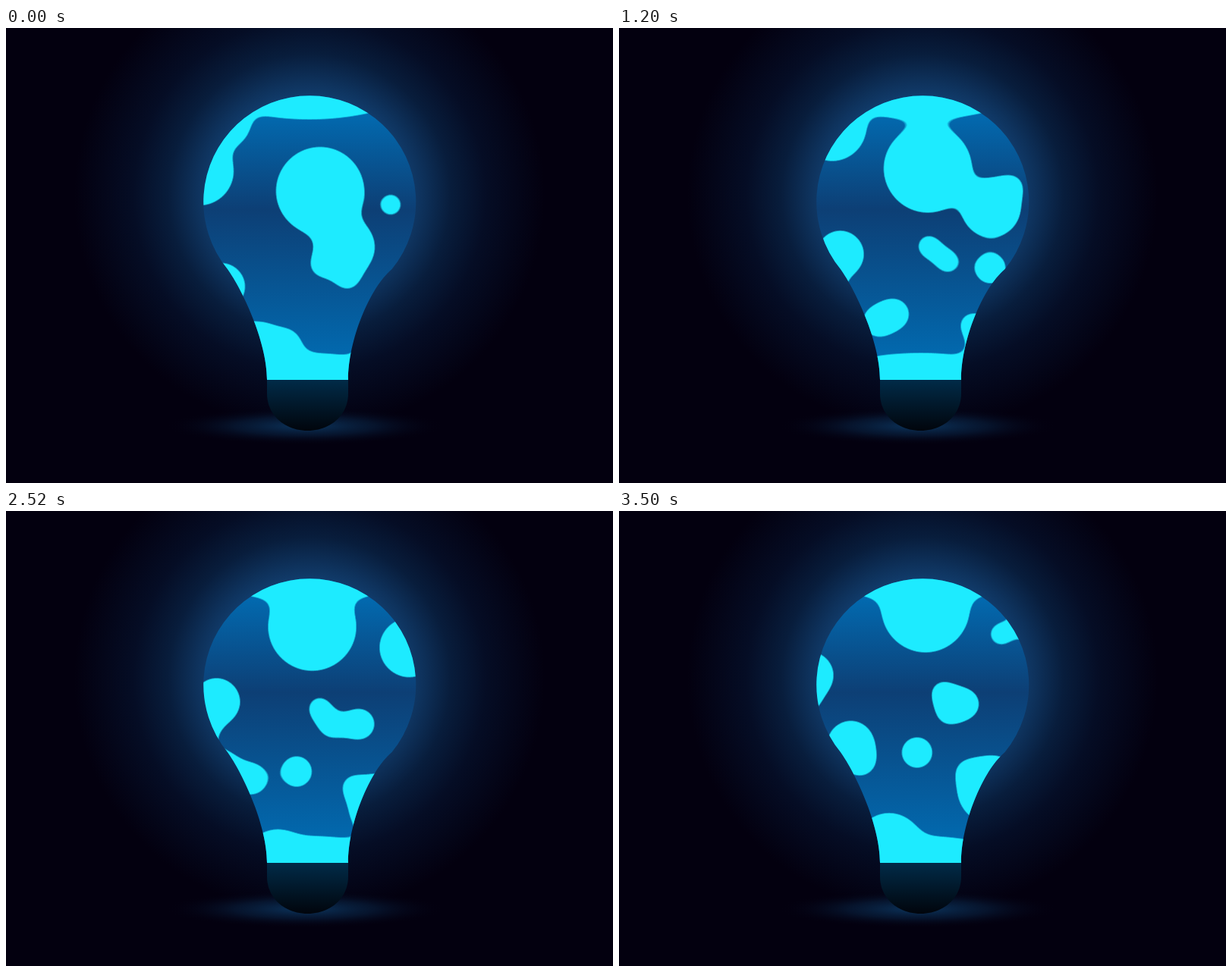
Animation, 800 px wide and 600 px high, one loop 3.52 s. Source, as an HTML page:

```html
<!DOCTYPE html>
<html>
<head>
<meta charset="utf-8">
<title>Lava bulb</title>
<style>
  html, body { margin: 0; width: 100%; height: 100%; overflow: hidden; background: #03000f; }
  svg { display: block; width: 100vw; height: 100vh; }
</style>
</head>
<body>
<svg viewBox="0 0 800 600">
  <defs>
    <radialGradient id="glow" gradientUnits="userSpaceOnUse" cx="400" cy="220" r="310">
      <stop offset=".4" stop-color="#123f70"/>
      <stop offset=".48" stop-color="#0e325c"/>
      <stop offset=".6" stop-color="#081d3c"/>
      <stop offset=".75" stop-color="#050d25"/>
      <stop offset="1" stop-color="#03000f"/>
    </radialGradient>
    <radialGradient id="floor">
      <stop offset="0" stop-color="#0d3e6b" stop-opacity=".85"/>
      <stop offset=".5" stop-color="#0a2c50" stop-opacity=".45"/>
      <stop offset="1" stop-color="#03000f" stop-opacity="0"/>
    </radialGradient>
    <linearGradient id="glass" x2="0" y2="1">
      <stop offset="0" stop-color="#0072bb"/>
      <stop offset=".4" stop-color="#0d3f75"/>
      <stop offset="1" stop-color="#0070b8"/>
    </linearGradient>
    <linearGradient id="socket" x2="0" y2="1">
      <stop offset="0" stop-color="#012b48"/>
      <stop offset="1" stop-color="#01050c"/>
    </linearGradient>
    <path id="bulb" d="M344 464C344 412 310 343 292 318A140 140 0 1 1 508.5 318C479 343 451 412 451 464Z"/>
    <clipPath id="inside"><use href="#bulb"/></clipPath>
    <filter id="goo" filterUnits="userSpaceOnUse" x="180" y="30" width="440" height="490" color-interpolation-filters="sRGB">
      <feGaussianBlur stdDeviation="12"/>
      <feColorMatrix values="0 0 0 0 .114  0 0 0 0 .922  0 0 0 0 1  0 0 0 18 -7"/>
    </filter>
  </defs>
  <rect width="800" height="600" fill="url(#glow)"/>
  <ellipse cx="394" cy="525" rx="185" ry="25" fill="url(#floor)"/>
  <path d="M344 464H451V482C451 511 427 531 397.5 531S344 511 344 482Z" fill="url(#socket)"/>
  <use href="#bulb" fill="url(#glass)"/>
  <g clip-path="url(#inside)">
    <g id="lava" filter="url(#goo)"></g>
  </g>
</svg>
<script>
const LOOP = 3520, BLUR = 12;
const lava = document.getElementById('lava');
const balls = [];

// A ball rises steadily between two points; its path bows sideways by `bow`.
function ball(radius, [x, y], [endX, endY] = [x, y], bow = 0) {
  const node = document.createElementNS('http://www.w3.org/2000/svg', 'circle');
  // offset the size change caused by the blur and threshold
  node.setAttribute('r', radius + BLUR * BLUR / (2 * radius) - 0.21 * BLUR);
  lava.append(node);
  balls.push(u => {
    node.setAttribute('cx', x + (endX - x) * u + bow * 4 * u * (1 - u));
    node.setAttribute('cy', y + (endY - y) * u);
  });
}

const DROP = 13, SMALL = 20, MEDIUM = 31, LARGE = 39, HUGE = 45, POOL = 375;

// still pools at the top and bottom
ball(POOL, [400, 120.5 - POOL]);
ball(POOL, [398, 428.5 + POOL]);

// middle of the bulb
ball(58, [414, 215], [404, 128], -4);
ball(LARGE, [447, 289], [558, 137], 6);
ball(SMALL, [520, 349], [454, 254], -9);
ball(DROP, [507, 233], [503, 162], 13);
ball(DROP, [450, 330], [434, 266], -12);
ball(DROP, [416, 313], [427, 239], -13);

// left side
ball(HUGE, [255, 189], [247, 17], 32);
ball(MEDIUM, [291, 126], [168, -10]);
ball(MEDIUM, [284, 341], [251, 216], 21);
ball(MEDIUM, [210, 442], [306, 307], 2);
ball(SMALL, [295, 400], [243, 248]);

// neck
ball(SMALL, [368, 417], [318, 328], -10);
ball(SMALL, [335, 408], [393, 318], 8);
ball(HUGE, [364, 520], [356, 443]);
ball(HUGE, [512, 450], [491, 367]);
ball(DROP, [478, 416], [459, 343], -8);

function draw() {
  const u = performance.now() % LOOP / LOOP;
  balls.forEach(move => move(u));
  requestAnimationFrame(draw);
}
draw();
</script>
</body>
</html>
```
